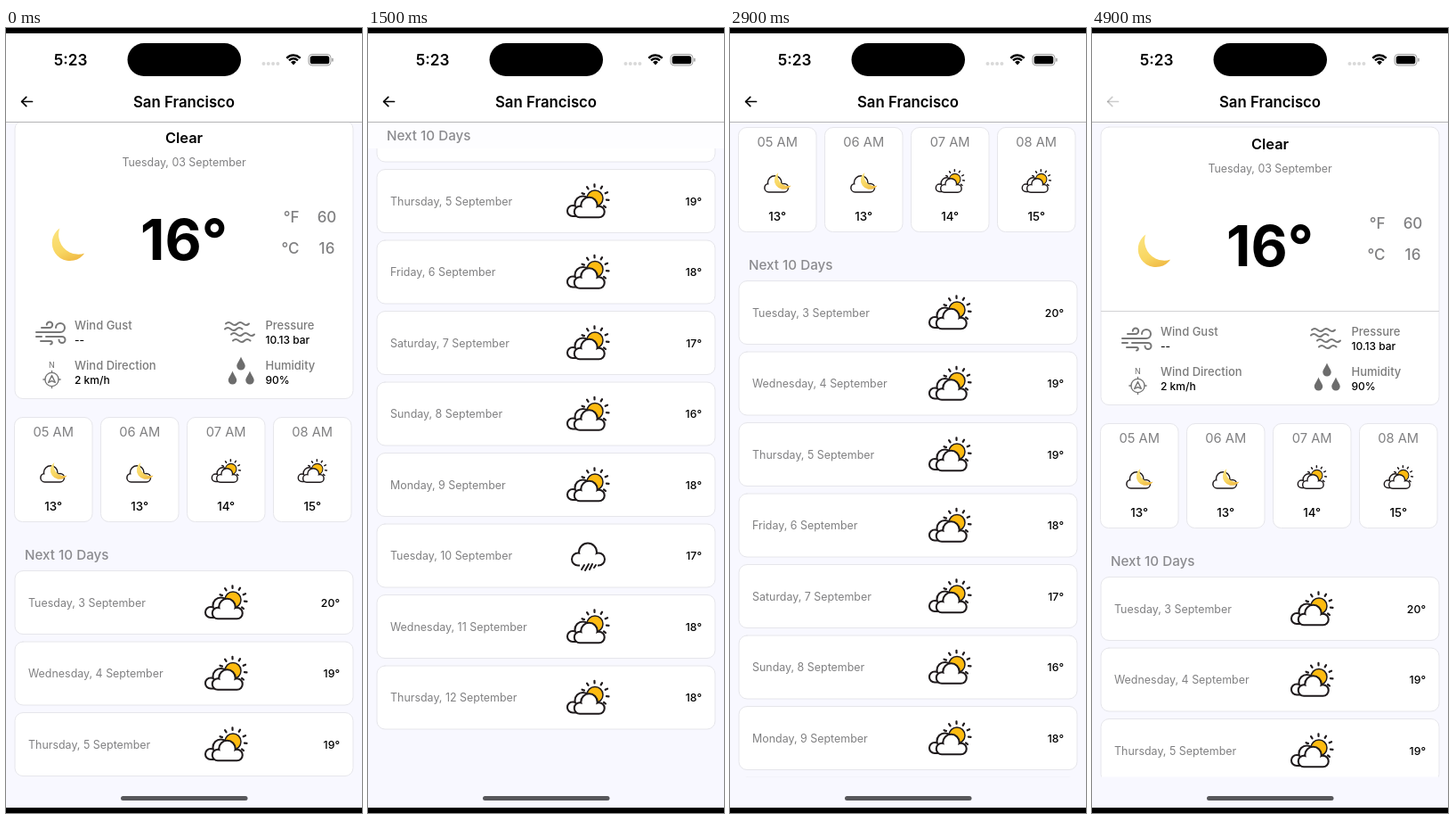
Write an HTML page with a canvas that moves like this. It is 400x880 px and loops after 5 s.

```html
<!DOCTYPE html>
<html lang="en">
<head>
<meta charset="utf-8">
<title>Weather</title>
<style>
html, body { margin: 0; width: 100%; height: 100%; overflow: hidden; background: #000; }
canvas { display: block; width: 400px; height: 880px; }
</style>
</head>
<body>
<canvas id="stage"></canvas>
<script>
const W = 400, H = 880, LOOP = 5000, STEP = 100;
const canvas = document.getElementById('stage');
const ctx = canvas.getContext('2d');
const dpr = window.devicePixelRatio || 1;
canvas.width = W * dpr;
canvas.height = H * dpr;

const INK = '#1f1a1c', GREY = '#808082', PAGE = '#f8f8ff', EDGE = '#e6e6eb';
const DEG = Math.PI / 180;

// Scroll keys: [ms, offset]
const KEYS = [[0, 7], [700, 308], [1200, 532], [1500, 616], [1800, 641], [2100, 650],
  [2400, 624], [2900, 332], [3400, 42], [3700, -1], [4000, 0], [5000, 0]];

const HOURS = [['05 AM', '13°', moonCloud], ['06 AM', '13°', moonCloud],
  ['07 AM', '14°', smallSunCloud], ['08 AM', '15°', smallSunCloud]];
const WEEK = ['Sunday', 'Monday', 'Tuesday', 'Wednesday', 'Thursday', 'Friday', 'Saturday'];
const TEMPS = [20, 19, 19, 18, 17, 16, 18, 17, 18, 18];
const RAINY = 7;

const WIND = new Path2D('M-10 -5H-1a3.2 3.2 0 1 0-3.2-3.2M-16 0H11a5 5 0 1 0-5-5' +
  'M-16 5H-10M-5 5H13a3.5 3.5 0 1 1-3.5 3.5M-11 10H0a1.8 1.8 0 0 1 0 3.6');
const WAVES = new Path2D('M-15 -10q3-3 6.5 0t6.5 0t6.5 0t6.5 0M-16 -4q3-3 6.5 0t6.5 0t6.5 0' +
  'M-9 2q3-3 6.5 0t6.5 0t6.5 0t6.5 0M-7 9q3-3 6.5 0t6.5 0t6.5 0');
const DROP = new Path2D('M0 -8C2 -3 5 0 5 3A5 5 0 0 1-5 3C-5 0-2 -3 0 -8Z');
const RAIN = new Path2D('M-4 10L-7 15M1 9L-3 16M5 9L2 15M9 10L7 13');

// Monotone cubic interpolation through the keys
function scrollAt(t) {
  const slope = i => (KEYS[i + 1][1] - KEYS[i][1]) / (KEYS[i + 1][0] - KEYS[i][0]);
  const tangent = i => {
    if (i === 0) return slope(0);
    if (i === KEYS.length - 1) return 0;
    const a = slope(i - 1), b = slope(i);
    return a * b <= 0 ? 0 : 2 * a * b / (a + b);
  };
  let i = 0;
  while (i < KEYS.length - 2 && t >= KEYS[i + 1][0]) i++;
  const [t0, y0] = KEYS[i], [t1, y1] = KEYS[i + 1];
  const d = t1 - t0, u = (t - t0) / d, v = 1 - u;
  return y0 * (1 + 2 * u) * v * v + tangent(i) * d * u * v * v +
    y1 * u * u * (3 - 2 * u) - tangent(i + 1) * d * u * u * v;
}

function text(str, x, y, size, color = '#000', weight = 400, align = 'left') {
  ctx.font = `${weight} ${size}px Inter, "Open Sans", sans-serif`;
  ctx.textAlign = align;
  ctx.fillStyle = color;
  ctx.fillText(str, x, y + size * 0.36);
}

function rect(x, y, w, h, color) {
  ctx.fillStyle = color;
  ctx.fillRect(x, y, w, h);
}

function pill(x, y, w, h, r, color) {
  ctx.beginPath();
  ctx.roundRect(x, y, w, h, r);
  ctx.fillStyle = color;
  ctx.fill();
}

function card(x, y, w, h) {
  pill(x, y, w, h, 9, '#fff');
  ctx.strokeStyle = EDGE;
  ctx.lineWidth = 1;
  ctx.stroke();
}

function pen(color, width) {
  ctx.strokeStyle = color;
  ctx.lineWidth = width;
  ctx.lineCap = ctx.lineJoin = 'round';
}

function line(x0, y0, x1, y1) {
  ctx.beginPath();
  ctx.moveTo(x0, y0);
  ctx.lineTo(x1, y1);
  ctx.stroke();
}

function dot(x, y, r, color) {
  ctx.beginPath();
  ctx.arc(x, y, r, 0, 2 * Math.PI);
  ctx.fillStyle = color;
  ctx.fill();
}

function at(x, y, scale, draw) {
  ctx.save();
  ctx.translate(x, y);
  ctx.scale(scale, scale);
  draw();
  ctx.restore();
}

// Lobes run left, top, right; the outline lies outside the fill
function cloud(lobes, width) {
  const [l, , r] = lobes;
  ctx.beginPath();
  for (const [x, y, rad] of lobes) {
    ctx.moveTo(x + rad, y);
    ctx.arc(x, y, rad, 0, 2 * Math.PI);
  }
  ctx.rect(l[0], l[1] - l[2] * 0.7, r[0] - l[0], l[2] * 1.7);
  pen(INK, width * 2);
  ctx.stroke();
  ctx.fillStyle = '#fff';
  ctx.fill();
}

function sunCloud() {
  const sx = 8, sy = -3.5;
  pen(INK, 2.2);
  for (let i = 0; i < 7; i++) {
    const a = (-158 + 33 * i) * DEG, c = Math.cos(a), s = Math.sin(a);
    line(sx + 13 * c, sy + 13 * s, sx + 15.6 * c, sy + 15.6 * s);
  }
  dot(sx, sy, 9, '#fdbb11');
  pen(INK, 1.5);
  ctx.stroke();
  cloud([[-17, 10.5, 5], [-5.5, 3, 8], [4, 10.5, 5]], 2.1);
  cloud([[-9, 11.5, 5.2], [1.5, 4.5, 8.2], [12.5, 11.5, 5.2]], 2.1);
}

function smallSunCloud(x, y) {
  at(x, y, 0.69, sunCloud);
}

function moon(x, y, scale) {
  at(x, y, scale, () => {
    const g = ctx.createLinearGradient(-10, -16, 6, 20);
    g.addColorStop(0, '#fbe27c');
    g.addColorStop(0.6, '#f8d662');
    g.addColorStop(1, '#efb843');
    ctx.beginPath();
    ctx.arc(0, 0, 19.5, -125 * DEG, 35 * DEG, true);
    ctx.arc(9.1, -9.1, 21.4, 71.2 * DEG, 198.8 * DEG);
    ctx.closePath();
    ctx.fillStyle = g;
    ctx.fill();
  });
}

function moonCloud(x, y) {
  at(x, y, 1, () => cloud([[-9.6, 7.2, 4], [-3, 1.5, 7], [7.5, 7.2, 4]], 1.5));
  moon(x + 7, y - 1.5, 0.53);
}

function rainCloud() {
  cloud([[-11, 3.5, 6], [0, -4.5, 9], [12, 3.5, 6]], 2);
  rect(-9, 5, 20, 8, '#fff');
  pen(INK, 2);
  ctx.stroke(RAIN);
}

function compass() {
  pen('#757575', 1.4);
  ctx.beginPath();
  ctx.arc(0, 0, 7.6, 0, 2 * Math.PI);
  ctx.stroke();
  for (let i = 0; i < 4; i++) {
    const c = Math.cos(i * 90 * DEG), s = Math.sin(i * 90 * DEG);
    line(7.6 * c, 7.6 * s, 9.6 * c, 9.6 * s);
  }
  ctx.beginPath();
  ctx.moveTo(0, -4.5);
  ctx.lineTo(3.8, 3.4);
  ctx.lineTo(0, 1.6);
  ctx.lineTo(-3.8, 3.4);
  ctx.closePath();
  ctx.stroke();
}

function detail(label, value, x, y) {
  text(label, x, y, 13, '#7b7b7b', 500);
  text(value, x, y + 16.5, 12, '#000', 500);
}

function summary(t) {
  card(10, 111, 380, 311.5);
  text('Clear', 200, 130, 16.4, '#000', 600, 'center');
  text('Tuesday, 03 September', 200, 157.5, 12.4, GREY, 400, 'center');
  moon(71.8, 248, 1.03);
  text('16°', 200, 244, 63.5, '#000', 700, 'center');
  text('°F', 329.5, 219, 17, GREY, 500, 'right');
  text('60', 360.5, 219, 17, GREY, 500, 'center');
  text('°C', 329.5, 254, 17, GREY, 500, 'right');
  text('16', 360.5, 254, 17, GREY, 500, 'center');
  if (t >= 3900) rect(10, 317, 380, 1, '#d2d2d4');

  pen('#777', 2);
  at(50, 348, 1, () => ctx.stroke(WIND));
  at(262, 348.5, 1, () => ctx.stroke(WAVES));
  text('N', 51.5, 385, 9, '#6f6f6f', 400, 'center');
  at(51.5, 401, 1, compass);
  ctx.fillStyle = '#6c6c6c';
  for (const [x, y] of [[264, 383], [254.5, 399], [274, 399]])
    at(x, y, 0.95, () => ctx.fill(DROP));
  detail('Wind Gust', '--', 77, 340.5);
  detail('Wind Direction', '2 km/h', 77, 385.5);
  detail('Pressure', '10.13 bar', 291.5, 340.5);
  detail('Humidity', '90%', 291.5, 385.5);
}

function hours() {
  HOURS.forEach(([hour, temp, icon], i) => {
    const x = 9.5 + 97 * i, mid = x + 43.7;
    card(x, 443.5, 87.5, 117);
    text(hour, mid, 459.5, 14.7, GREY, 400, 'center');
    icon(mid, 504);
    text(temp, mid, 543, 13.3, '#000', 500, 'center');
  });
}

function days() {
  TEMPS.forEach((temp, i) => {
    const y = 615.5 + 79.5 * i, mid = y + 36;
    card(10, y, 380, 71);
    text(`${WEEK[(i + 2) % 7]}, ${i + 3} September`, 25, mid, 12.45, GREY);
    at(247, mid, 1, i === RAINY ? rainCloud : sunCloud);
    text(temp + '°', 375, mid, 12.3, '#000', 500, 'right');
  });
}

function sectionTitle(scroll) {
  const y = Math.max(598 - scroll, 121);
  if (y === 121) rect(0, 106, W, 29, '#fdfdff');
  text('Next 10 Days', 21, y, 15.2, '#8b8b8f', 500);
}

function statusBar() {
  text('5:23', 72.5, 36, 17.2, '#000', 600, 'center');
  pill(136.5, 17, 127.5, 37, 18.5, '#000');
  for (let i = 0; i < 4; i++) dot(289.5 + 5.3 * i, 40, 2, '#d9d9d9');

  ctx.strokeStyle = '#000';
  ctx.lineCap = 'butt';
  ctx.lineWidth = 2.4;
  for (const r of [10.5, 6.8]) {
    ctx.beginPath();
    ctx.arc(323, 41, r, -137 * DEG, -43 * DEG);
    ctx.stroke();
  }
  ctx.beginPath();
  ctx.moveTo(323, 41.5);
  ctx.arc(323, 41, 4, -137 * DEG, -43 * DEG);
  ctx.fillStyle = '#000';
  ctx.fill();

  ctx.beginPath();
  ctx.roundRect(340, 29.5, 25, 12.5, 4);
  ctx.strokeStyle = '#9c9c9c';
  ctx.lineWidth = 1;
  ctx.stroke();
  pill(341.7, 31.2, 21.6, 9.1, 2.6, '#000');
  pill(366.2, 33.7, 1.5, 4, 0.8, '#9c9c9c');
}

function navBar(t) {
  const press = Math.min(1, Math.max(0, (t - 4400) / 200));
  ctx.globalAlpha = 1 - 0.8 * press;
  pen('#000', 1.7);
  line(17.8, 82.5, 29.5, 82.5);
  ctx.beginPath();
  ctx.moveTo(22.8, 77.3);
  ctx.lineTo(17.6, 82.5);
  ctx.lineTo(22.8, 87.7);
  ctx.stroke();
  ctx.globalAlpha = 1;
  text('San Francisco', 200, 83, 16.75, '#000', 600, 'center');
  rect(0, 105, W, 1, '#b4b4b6');
}

function render(t) {
  const scroll = Math.round(scrollAt(t) * 2) / 2;
  ctx.setTransform(dpr, 0, 0, dpr, 0, 0);
  rect(0, 0, W, H, '#000');
  rect(0, 6, W, 868, PAGE);

  ctx.save();
  ctx.beginPath();
  ctx.rect(0, 106, W, 733.5);
  ctx.clip();
  ctx.save();
  ctx.translate(0, -scroll);
  summary(t);
  hours();
  days();
  ctx.restore();
  sectionTitle(scroll);
  ctx.restore();

  rect(0, 6, W, 99, '#fff');
  statusBar();
  navBar(t);
  pill(129, 861, 142.5, 5, 2.5, '#57575b');
}

const start = performance.now();
function tick() {
  const t = (performance.now() - start) % LOOP;
  render(Math.floor(t / STEP) * STEP);
  requestAnimationFrame(tick);
}
tick();
</script>
</body>
</html>
```
